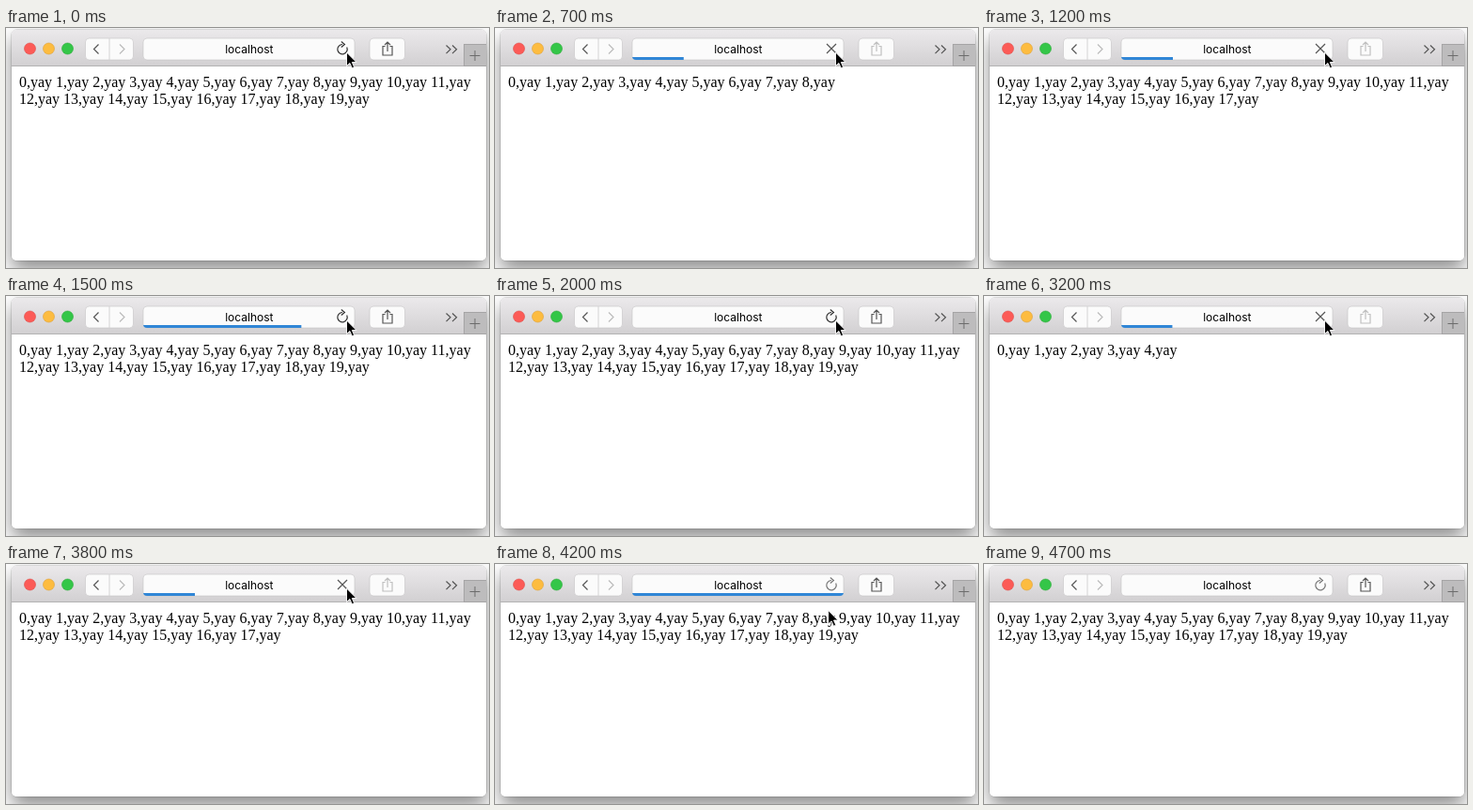
Recreate the animation shown at these times as an HTML page. Size 514 px wide and 256 px high, loop 4800 ms.

```html
<!DOCTYPE html>
<html lang="en">
<head>
<meta charset="utf-8">
<title>Streaming page load</title>
<style>
  html, body { margin: 0; width: 100%; height: 100%; overflow: hidden; background: #fff; }
  svg { display: block; }
  .page { font: 16px "Liberation Serif", Times, serif; }
  .address { font: 12px Inter, sans-serif; text-anchor: middle; }
  .button { fill: #fbfbfb; stroke: #c4c3c4; stroke-width: .6; }
  .icon { fill: none; stroke: #555; stroke-width: 1.2; }
</style>
</head>
<body>
<svg width="514" height="256" viewBox="0 0 514 256">
  <defs>
    <linearGradient id="chrome" x2="0" y2="1">
      <stop stop-color="#ebe9eb"/><stop offset="1" stop-color="#d2d0d2"/>
    </linearGradient>
    <filter id="shadow" x="-20%" y="-20%" width="140%" height="150%">
      <feDropShadow dx="0" dy="10" stdDeviation="10" flood-opacity=".45"/>
    </filter>
    <clipPath id="window"><rect x="6" y="2" width="505" height="246" rx="5"/></clipPath>
    <clipPath id="field"><rect x="146" y="11" width="225" height="23" rx="4"/></clipPath>
  </defs>

  <rect x="6" y="2" width="505" height="246" rx="5" fill="#fff" stroke="#000" stroke-opacity=".2" filter="url(#shadow)"/>
  <g clip-path="url(#window)">
    <rect x="6" y="2" width="505" height="246" fill="#fff"/>
    <rect x="6" y="2" width="505" height="38" fill="url(#chrome)"/>
    <rect x="6" y="40" width="505" height="1" fill="#b3b2b3"/>
    <rect x="487.5" y="17.5" width="24" height="23" fill="#bdbcbd" stroke="#a5a4a5"/>
    <path d="M493.5 29.5h11M499 24v11" fill="none" stroke="#6c6c6c"/>
  </g>

  <g stroke-width=".6">
    <circle cx="25.5" cy="22" r="6" fill="#fc5b57" stroke="#df4744"/>
    <circle cx="45.5" cy="22" r="6" fill="#fdbc40" stroke="#dea034"/>
    <circle cx="65.5" cy="22" r="6" fill="#34c648" stroke="#27aa35"/>
  </g>

  <rect class="button" x="84.5" y="11" width="51" height="23" rx="4"/>
  <path d="M110 11v23" stroke="#d4d3d4"/>
  <path class="icon" d="M98.500 17.500l-5 5 5 5"/>
  <path class="icon" d="M121 17.500l5 5-5 5" style="stroke:#bbb"/>

  <rect class="button" x="146" y="11" width="225" height="23" rx="4"/>
  <text class="address" x="258.800" y="27">localhost</text>
  <rect id="bar" x="146" y="31" height="3" fill="#3086d6" clip-path="url(#field)"/>
  <g id="reload" class="icon">
    <path d="M362.700 20.500a5.200 5.200 0 1 1-4.700-3"/>
    <path d="M356.800 14.500l3.600 3-3.600 3"/>
  </g>
  <path id="stop" class="icon" d="M353 17l10 10m0-10l-10 10"/>

  <rect class="button" x="387" y="11" width="37.500" height="23" rx="4"/>
  <path id="share" class="icon" d="M403.500 19.500h-2.500v9.500h10v-9.500h-2.500M406 25v-10m-3 3l3-3 3 3"/>
  <path class="icon" d="M468.500 18.500l4.500 4.300-4.500 4.300m6.500-8.600l4.500 4.300-4.500 4.300"/>

  <g class="page">
    <text id="line1" x="14" y="63"></text>
    <text id="line2" x="14" y="81"></text>
  </g>
  <path id="cursor" d="M0 0v14.500l3.400-3.100 2.300 5.300 2.400-1-2.300-5.200h4.600z" fill="#000" stroke="#fff" stroke-width=".9"/>
</svg>

<script>
const LOOP = 4800, STEP = 100, ITEMS = 20, PER_LINE = 12;
const FIELD_WIDTH = 225, STALL_WIDTH = 55;
const loads = [
  { start: 200, firstItem: 250, gap: 55, end: 1400 },
  { start: 2800, firstItem: 2990, gap: 47, end: 4000 }
];
const $ = id => document.getElementById(id);
const clamp = (v, lo, hi) => Math.min(hi, Math.max(lo, v));
const show = (id, visible) => $(id).style.display = visible ? '' : 'none';
const words = Array.from({ length: ITEMS }, (_, i) => `${i},yay`);

function drawBar(t, load) {
  let width = 0, opacity = 1;
  if (load && t < load.end) {
    width = STALL_WIDTH * (1 - 0.4 ** ((t - load.start) / STEP + 1));
  } else if (load) {
    const k = (t - load.end) / STEP;
    width = STALL_WIDTH + (FIELD_WIDTH - STALL_WIDTH) * Math.min(1, (k + 1) / 3);
    opacity = clamp((5 - k) / 3, 0, 1);
  }
  $('bar').setAttribute('width', width);
  $('bar').setAttribute('opacity', opacity);
}

function drawCursor(t) {
  const p = clamp((t - 4100) / 500, 0, 1);
  const eased = p * p * (3 - 2 * p);
  $('cursor').setAttribute('transform', `translate(${362.5 - 75 * eased} ${26 + 226 * eased})`);
  show('cursor', t < 4700);
  $('reload').style.stroke = eased < 0.05 ? '#333' : '#777';
}

function draw(time) {
  const t = Math.floor(time % LOOP / STEP) * STEP;
  const load = loads.findLast(l => t >= l.start);
  const loading = !!load && t < load.end;

  // The old page stays until the first item of the new one arrives.
  const count = load && t >= load.firstItem
    ? Math.min(ITEMS, Math.floor(1 + (t - load.firstItem) / load.gap))
    : ITEMS;
  $('line1').textContent = words.slice(0, Math.min(count, PER_LINE)).join(' ');
  $('line2').textContent = words.slice(PER_LINE, count).join(' ');

  show('stop', loading);
  show('reload', !loading);
  $('share').style.stroke = loading ? '#c0c0c0' : '#555';
  drawBar(t, load);
  drawCursor(t);
}

const origin = performance.now();
function tick() {
  draw(performance.now() - origin);
  requestAnimationFrame(tick);
}
tick();
</script>
</body>
</html>
```
